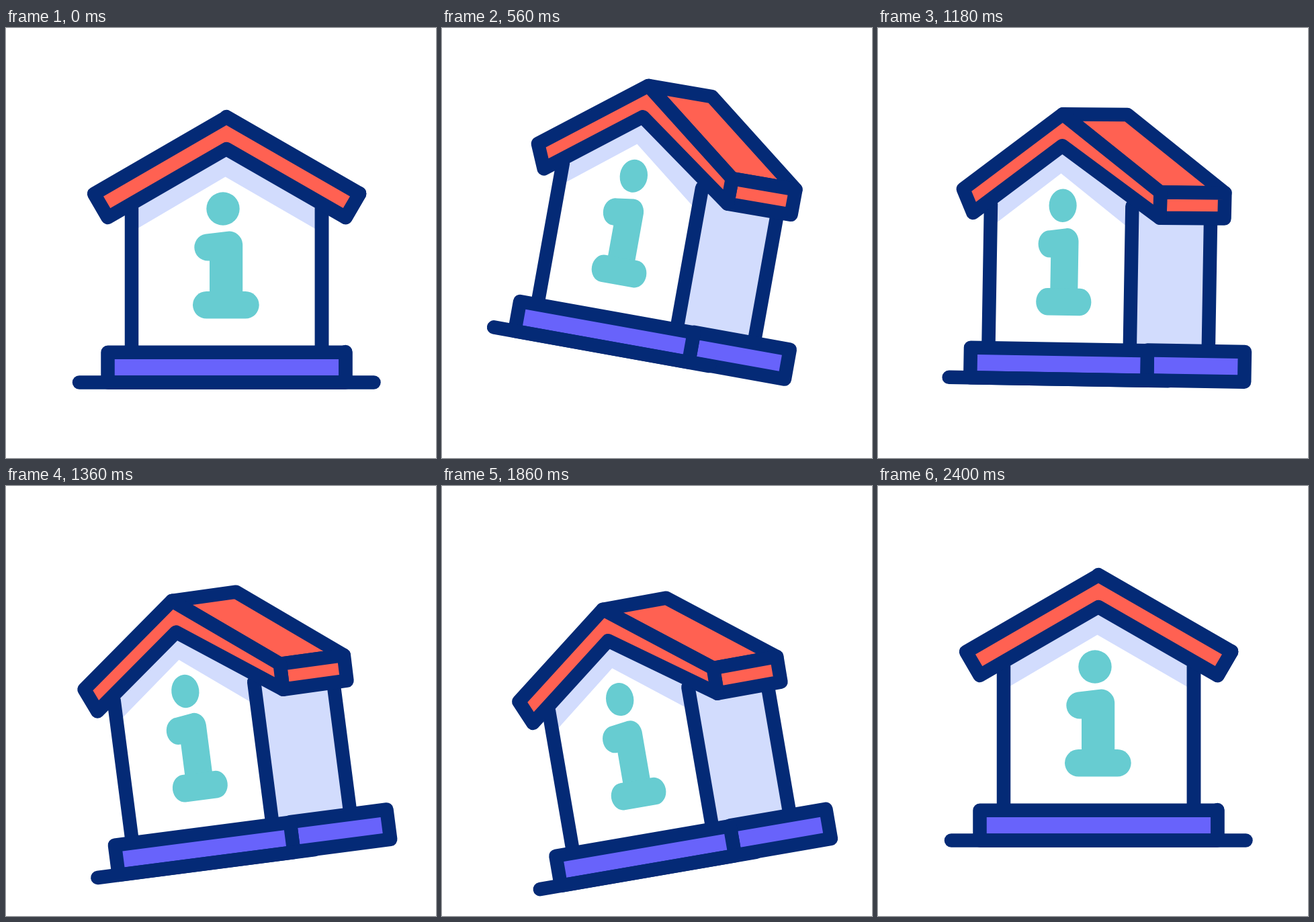
An HTML page with a canvas for the animation above (2420 ms loop, 640 px wide and 640 px high).

```html
<!DOCTYPE html>
<html lang="en">
<head>
<meta charset="utf-8">
<title>Information house</title>
<style>
  html, body { margin: 0; width: 100%; height: 100%; overflow: hidden; background: #fff; }
  canvas { display: block; width: 640px; height: 640px; }
</style>
</head>
<body>
<canvas id="stage" width="640" height="640"></canvas>
<script>
const ctx = document.getElementById('stage').getContext('2d');
const NAVY = '#042A76', RED = '#FF6152', PURPLE = '#6863FB', TEAL = '#67CCD1', PALE = '#D2DCFD';
const LOOP = 2420, STEP = 20, SWING = 800, TURN = 533.33, END = 3 * SWING;

const smooth = u => {
  u = Math.max(0, Math.min(1, u));
  return u * u * (3 - 2 * u);
};

// Goes 0 → 1 → -1 → 0
function tiltAt(t) {
  if (t < SWING) return smooth(t / SWING);
  if (t < 2 * SWING) return 1 - 2 * smooth(t / SWING - 1);
  return smooth(t / SWING - 2) - 1;
}

const turnAt = t => smooth(Math.min(t, END - t) / TURN);

function trace(points) {
  ctx.beginPath();
  points.forEach(([x, y]) => ctx.lineTo(x, y));
}

function fillShape(points, color) {
  trace(points);
  ctx.closePath();
  ctx.fillStyle = color;
  ctx.fill();
}

function outlined(points, color) {
  fillShape(points, color);
  ctx.stroke();
}

function line(...points) {
  trace(points);
  ctx.stroke();
}

function drawLetter(turn) {
  ctx.save();
  ctx.translate(214 - 48.9 * turn, 0);
  ctx.scale(1 - 0.167 * turn, 1);
  ctx.fillStyle = TEAL;

  ctx.beginPath();
  ctx.arc(0, -258.4, 24.7, 0, 2 * Math.PI);
  ctx.fill();

  ctx.beginPath();
  ctx.arc(-22.5, -201, 20.2, Math.PI / 2, 1.5 * Math.PI);
  ctx.lineTo(7, -224.6);
  ctx.arc(9, -204.6, 20.2, -1.65, 0);
  ctx.lineTo(29.2, -120);
  ctx.lineTo(-20, -120);
  ctx.lineTo(-20, -180.8);
  ctx.fill();

  ctx.beginPath();
  ctx.roundRect(-45, -135.4, 98.7, 40.6, 20.3);
  ctx.fill();
  ctx.restore();
}

function drawHouse(turn) {
  const k = 1 - 0.2566 * turn;
  const front = points => points.map(([x, y]) => [x * k, y]);

  // Walls
  const wallL = 78 * k, wallR = 361 * k, wallBack = wallR + 117 * turn;
  const wallTop = -259, wallBottom = -45;
  fillShape([[wallR, wallTop], [wallBack, wallTop], [wallBack, wallBottom], [wallR, wallBottom]], PALE);
  fillShape(front([[78, -266], [219, -347], [361, -266], [361, -223], [217.5, -306], [78, -224]]), PALE);
  drawLetter(turn);
  for (const x of [wallL, wallR, wallBack]) line([x, wallTop], [x, wallBottom]);

  // Base and ground
  const baseR = 396.3 * k, baseBack = baseR + 145 * turn;
  outlined([[baseR, -45.4], [baseBack, -45.4], [baseBack, -0.6], [baseR, -0.6]], PURPLE);
  outlined(front([[42.5, -44.7], [396.3, -44.7], [396.3, 0], [42.5, 0]]), PURPLE);
  line([0, 0], [438.5 * k, 0]);

  // Roof
  const depth = 96 * turn;
  const apex = [219 * k, -394.5];
  const tip = [417 * k, -280.5];
  const eave = [396.5 * k + 15 * turn, -245.4 + 3 * turn];
  const back = ([x, y]) => [x + depth, y - 0.8];
  outlined([apex, back(apex), back(tip), tip], RED);
  outlined([tip, back(tip), back(eave), eave], RED);
  outlined([apex, tip, eave, ...front([[219, -347.4], [42.5, -245.4], [22, -280.5]])], RED);
}

function render(t) {
  t = Math.min(t, END);
  const tilt = tiltAt(t);
  ctx.fillStyle = '#fff';
  ctx.fillRect(0, 0, 640, 640);
  ctx.save();
  ctx.translate(320, 328.4 - 53 * tilt);
  ctx.rotate(13 * tilt * Math.PI / 180);
  ctx.translate(-211, 199);
  ctx.strokeStyle = NAVY;
  ctx.lineWidth = 20.5;
  ctx.lineCap = ctx.lineJoin = 'round';
  drawHouse(turnAt(t));
  ctx.restore();
}

const start = performance.now();
function tick() {
  const t = (performance.now() - start) % LOOP;
  render(Math.floor(t / STEP) * STEP);
  requestAnimationFrame(tick);
}
tick();
</script>
</body>
</html>
```
